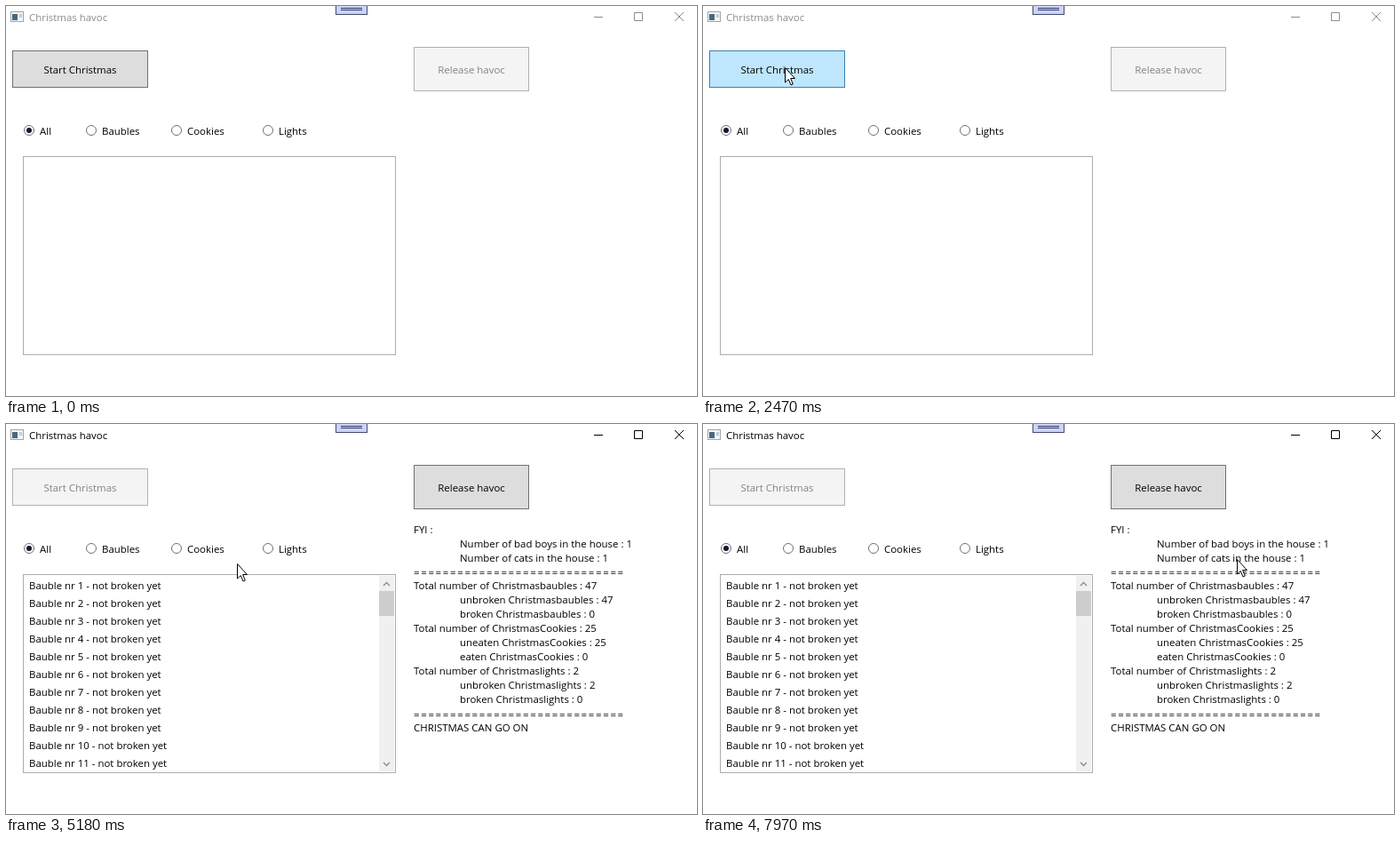
An HTML page that plays this animation: 778x439 px, repeating every 8000 ms.

```html
<!DOCTYPE html>
<html lang="en">
<head>
<meta charset="utf-8">
<title>Christmas havoc</title>
<style>
  html, body { margin: 0; height: 100%; overflow: hidden; background: #fff; }
  svg { display: block; font: 11.45px "Open Sans", sans-serif; }
  .mid { text-anchor: middle; }
  .rule { letter-spacing: 1.66px; transform: translateY(1px); }
  .line { fill: none; stroke: currentColor; }
  #caption { color: #8c8c8c; fill: currentColor; }
  #caption.active { color: #000; }
  .button rect { fill: #ddd; stroke: #707070; }
  .button.hover rect { fill: #bee6fd; stroke: #3c7fb1; }
  .button.pressed rect { fill: #c4e5f6; stroke: #2c628b; }
  .button.disabled rect { fill: #f4f4f4; stroke: #adb2b5; }
  .button.disabled text { fill: #838383; }
</style>
</head>
<body>
<svg width="778" height="439" viewBox="0 0 778 439">
  <rect x="5.5" y="6.5" width="14" height="11" fill="#f4f6f7" stroke="#a0a5a8"/>
  <rect x="7" y="9" width="6" height="7" fill="#47687e"/>
  <path d="M15 9h3v4h-3z" fill="#c3cdd4"/>
  <g id="caption">
    <text x="26" y="17">Christmas havoc</text>
    <path class="line" d="M662 12.5h10M707.5 7.5h9v9h-9zM753 7l10 10M763 7l-10 10"/>
  </g>
  <rect x="371.5" y="-1.5" width="35" height="11" fill="#ccd4f5" stroke="#45496f"/>
  <path d="M377 2.5h24M377 4.5h24" stroke="#30366b"/>
  <g id="start" class="button">
    <rect x="7.5" y="50.5" width="152" height="41"/>
    <text class="mid" x="83.5" y="76">Start Christmas</text>
  </g>
  <g id="release" class="button">
    <rect x="459.5" y="46.5" width="129" height="49"/>
    <text class="mid" x="524" y="76">Release havoc</text>
  </g>
  <g id="filters" color="#707070"></g>
  <circle cx="26" cy="140" r="3" fill="#17172b"/>
  <rect x="19.5" y="169.5" width="419" height="223" fill="#fff" stroke="#abadb3"/>
  <g id="results">
    <path d="M420 171h17v220h-17z" fill="#f0f0f0"/>
    <path d="M420 188h17v28h-17z" fill="#cdcdcd"/>
    <path d="M425 182l3.5-3.5 3.5 3.5M425 381l3.5 3.5 3.5-3.5" fill="none" stroke="#8a8a8a" stroke-width="1.3"/>
  </g>
  <path id="cursor" d="M.5 .5V17L4.3 13.6 7 20 9.3 19 6.7 12.5H11.5z" fill="#fff" stroke="#000"/>
</svg>
<script>
const $ = id => document.getElementById(id);

function add(parent, name, attrs, content = '') {
  const node = document.createElementNS('http://www.w3.org/2000/svg', name);
  for (const key in attrs) node.setAttribute(key, attrs[key]);
  node.textContent = content;
  $(parent).append(node);
}

Object.entries({ All: 26, Baubles: 96, Cookies: 192, Lights: 295 }).forEach(([label, x]) => {
  add('filters', 'circle', { class: 'line', cx: x, cy: 140, r: 5.5 });
  add('filters', 'text', { x: x + 12, y: 145 }, label);
});

for (let i = 0; i < 11; i++)
  add('results', 'text', { x: 26, y: 186 + 20 * i }, `Bauble nr ${i + 1} - not broken yet`);

const rule = '='.repeat(29);
const tally = (kind, count, damage) => [
  `Total number of Christmas${kind} : ${count}`,
  `\tun${damage} Christmas${kind} : ${count}`,
  `\t${damage} Christmas${kind} : 0`
];
const report = [
  'FYI :', '\tNumber of bad boys in the house : 1', '\tNumber of cats in the house : 1', rule,
  ...tally('baubles', 47, 'broken'), ...tally('Cookies', 25, 'eaten'), ...tally('lights', 2, 'broken'),
  rule, 'CHRISTMAS CAN GO ON'
];
report.forEach((line, i) => add('results', 'text', {
  x: line[0] === '\t' ? 511 : 459,
  y: 122.6 + 15.96 * i,
  class: line === rule ? 'rule' : ''
}, line.trim()));

const ENTER = 920, HOVER = 1770, PRESS = 3170, DONE = 3400, LOOP = 8000;
const STEP = 77; // the pointer is redrawn about this often

// Pointer key points: time, x, y
const route = [
  [ENTER, 739, 428], [1300, 430, 8], [1690, 131, 46], [HOVER, 120, 53], [2560, 85, 72], [2860, 84, 71],
  [4330, 83, 71], [4660, 79, 83], [5190, 290, 169], [5570, 512, 143], [6030, 489, 133], [6400, 561, 143],
  [7010, 653, 134], [7110, 667, 134], [7320, 661, 137], [7740, 561, 150], [7970, 601, 152], [LOOP, 601, 152]
];

function pointerAt(t) {
  const next = route.findIndex(key => key[0] > t);
  const [t0, x0, y0] = route[next - 1], [t1, x1, y1] = route[next];
  const steps = Math.round((t1 - t0) / STEP) || 1;
  const u = Math.floor((t - t0) / (t1 - t0) * steps) / steps;
  return [Math.ceil(x0 + (x1 - x0) * u), Math.ceil(y0 + (y1 - y0) * u)];
}

function render(t) {
  const done = t >= DONE;
  const state = done ? 'disabled' : t >= PRESS ? 'pressed' : t >= HOVER ? 'hover' : '';
  $('caption').setAttribute('class', t >= PRESS ? 'active' : '');
  $('start').setAttribute('class', 'button ' + state);
  $('release').setAttribute('class', done ? 'button' : 'button disabled');
  $('results').style.display = done ? '' : 'none';
  const shown = t >= ENTER;
  $('cursor').style.display = shown ? '' : 'none';
  if (shown) $('cursor').setAttribute('transform', `translate(${pointerAt(t)})`);
}

const began = performance.now();
function tick() {
  render((performance.now() - began) % LOOP);
  requestAnimationFrame(tick);
}
tick();
</script>
</body>
</html>
```
